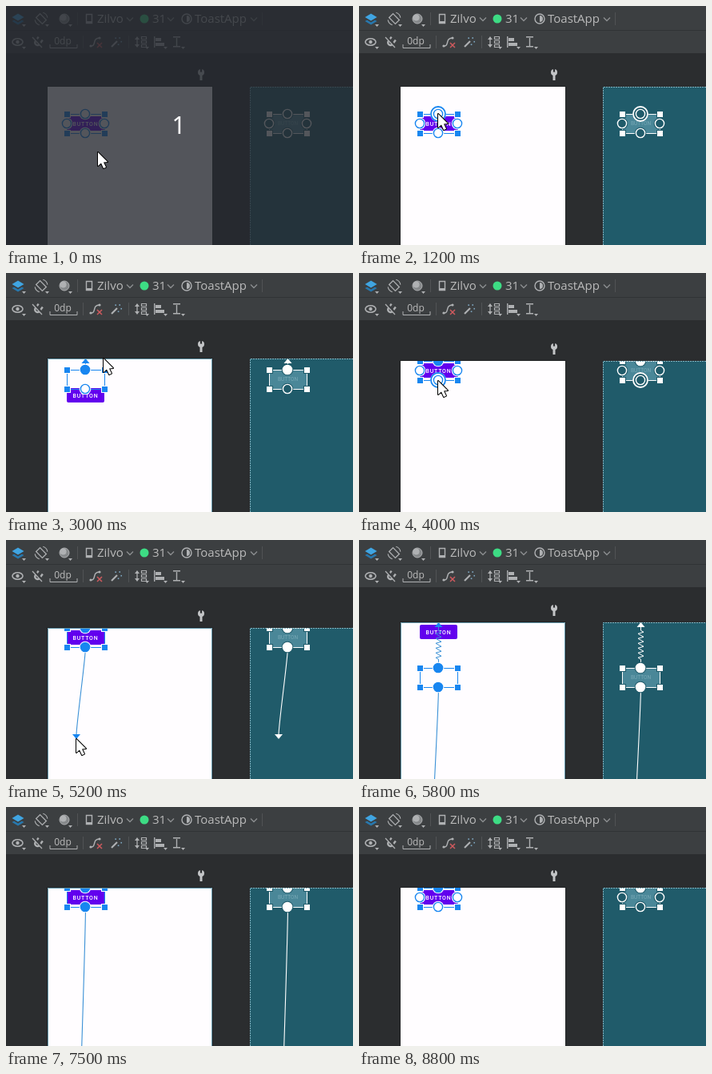
An HTML page with a canvas that plays this animation: 434 px wide and 299 px high, repeating every 9200 ms.

```html
<!DOCTYPE html>
<html lang="en">
<head>
<meta charset="utf-8">
<title>Layout editor constraints</title>
<style>
html, body { margin: 0; width: 100%; height: 100%; overflow: hidden; background: #2b2d2f; }
canvas { display: block; width: 434px; height: 299px; }
</style>
</head>
<body>
<canvas id="stage" width="434" height="299"></canvas>
<script>
const ctx = document.getElementById('stage').getContext('2d');
const W = 434, H = 299, LOOP = 9200, STEP = 100;
const GREY = '#afb1b3', BAR = '#3c3f41', SURFACE = '#2b2d2f', BLUE = '#1886f0', TEAL = '#205b6a';
const PAGE_Y = 101, LEFT = 76, RIGHT = 123, MID = 99, BUTTON_H = 24;
const START_GAP = 34, PREVIEW_GAP = 171, SCROLL = 9, BLUEPRINT_DX = 253;

// Motion
const ramp = (t, from, to) => Math.min(1, Math.max(0, (t - from) / (to - from)));
const smooth = k => k * k * (3 - 2 * k);
const mix = (a, b, k) => a.map((v, i) => v + (b[i] - v) * k);

function cursorAt(t) {
  const rest = [115, 183], handleSpot = [MID, 135], pageEdge = [122, 107];
  if (t < 1700) return mix(rest, handleSpot, smooth(ramp(t, 400, 1100)));
  if (t < 3300) return mix(handleSpot, pageEdge, ramp(t, 1700, 2700));
  if (t < 4300) return mix(pageEdge, handleSpot, smooth(ramp(t, 3300, 4000)));
  if (t < 7800) {
    const fall = (Math.min(t, 6000) - 4300) / 900;
    const sweep = Math.sin(Math.PI * ramp(t, 6600, 7500));
    return [MID - 11 * Math.min(1, fall) + 187 * sweep, 135 + 114 * fall * fall];
  }
  return mix([120, 330], [152, -22], ramp(t, 8100, 8800));
}

function sceneAt(t) {
  const shift = SCROLL * (smooth(ramp(t, 2700, 3200)) - smooth(ramp(t, 5300, 6000)));
  const preview = ramp(t, 5700, 6000) - ramp(t, 6600, 6900);
  const gap = START_GAP * (1 - ramp(t, 2700, 3200)) + PREVIEW_GAP * preview;
  const top = PAGE_Y + Math.round(shift);
  const drag = t >= 1800 && t < 2800 ? 'top' : t >= 4400 && t < 7800 ? 'bottom' : '';
  return {
    top, drag,
    cursor: cursorAt(t),
    frameY: top + Math.round(gap),
    buttonY: top + (t < 3200 ? START_GAP : 0),
    connected: t >= 2800,
    idle: !drag && !(t >= 2800 && t < 3200),
    hover: t >= 1000 && t < 1800 ? 'top' : t >= 4000 && t < 4400 ? 'bottom' : ''
  };
}

// Drawing helpers
function trace(points) {
  ctx.beginPath();
  points.forEach(([x, y]) => ctx.lineTo(x, y));
}

function stroke(color, width) {
  ctx.strokeStyle = color;
  ctx.lineWidth = width;
  ctx.stroke();
}

function line(color, width, ...points) {
  trace(points);
  stroke(color, width);
}

function poly(color, ...points) {
  trace(points);
  ctx.fillStyle = color;
  ctx.fill();
}

function rect(color, x, y, w, h) {
  ctx.fillStyle = color;
  ctx.fillRect(x, y, w, h);
}

function frame(color, width, x, y, w, h) {
  ctx.beginPath();
  ctx.rect(x, y, w, h);
  stroke(color, width);
}

function arc(color, width, x, y, r, from = 0, to = Math.PI * 2) {
  ctx.beginPath();
  ctx.arc(x, y, r, from, to);
  stroke(color, width);
}

function disc(color, x, y, r, from = 0, to = Math.PI * 2) {
  ctx.beginPath();
  ctx.arc(x, y, r, from, to);
  ctx.fillStyle = color;
  ctx.fill();
}

function text(str, x, y, font, color, align = 'left', spacing = 0) {
  ctx.font = font;
  ctx.fillStyle = color;
  ctx.textAlign = align;
  ctx.letterSpacing = spacing + 'px';
  ctx.fillText(str, x, y);
}

function placed(x, y, angle, draw) {
  ctx.save();
  ctx.translate(x, y);
  ctx.rotate(angle);
  draw();
  ctx.restore();
}

// Toolbars
const chevron = x => line('#8b8d8f', 1.4, [x - 4, 14.5], [x, 18.5], [x + 4, 14.5]);
const menuMark = (x, y) => poly(GREY, [x, y], [x + 5, y], [x + 2.5, y + 3]);
const divider = (x, y) => rect('#515355', x, y, 1, 16);
const diamond = (color, y) => poly(color, [7.5, y], [15, y - 4.5], [22.5, y], [15, y + 4.5]);

function topBar() {
  diamond('#2878ae', 19);
  diamond(BAR, 16);
  diamond('#40a5e2', 14);

  placed(44, 16, -Math.PI / 4, () => {
    frame(GREY, 1.3, -3.5, -5.5, 7, 11);
    arc(GREY, 1.1, 0, 0, 8, -0.5, 0.6);
    arc(GREY, 1.1, 0, 0, 8, Math.PI - 0.5, Math.PI + 0.6);
  });

  disc('#85888a', 73, 16, 6);
  disc(GREY, 71.5, 14.5, 4);
  arc(GREY, 1, 73, 16, 6);
  [20, 49, 78].forEach(x => menuMark(x, 23));
  [89, 320].forEach(x => divider(x, 8));

  frame(GREY, 1.4, 100.5, 10.5, 7, 11);
  rect(GREY, 100, 19, 8, 2);
  disc('#3ddc84', 173, 16, 5.5);
  arc(GREY, 1.4, 226, 16, 6);
  disc(GREY, 226, 16, 4, -Math.PI / 2, Math.PI / 2);

  const font = '15px "Open Sans", sans-serif';
  text('Zilvo', 114, 21, font, '#bbbbbb');
  text('31', 183, 21, font, '#bbbbbb');
  text('ToastApp', 236, 21, font, '#bbbbbb');
  [155, 206, 310].forEach(chevron);
}

function toolRow() {
  ctx.beginPath();
  ctx.ellipse(14.5, 45, 6.5, 4.2, 0, 0, Math.PI * 2);
  stroke(GREY, 1.6);
  disc(GREY, 14.5, 45, 2.2);

  placed(40, 45, Math.PI / 5, () => {
    line(GREY, 2.4, [-3.2, -5.5], [-3.2, 1]);
    line(GREY, 2.4, [3.2, -5.5], [3.2, 1]);
    arc(GREY, 2.4, 0, 1, 3.2, 0, Math.PI);
  });
  line(BAR, 3, [34, 38], [46, 51]);
  line(GREY, 1.2, [33, 39], [45, 52]);

  text('0dp', 71, 48, '12px "Open Sans", sans-serif', '#bbbbbb', 'center');
  line(GREY, 1, [55, 48], [55, 52.5], [89, 52.5], [89, 48]);

  ctx.beginPath();
  ctx.moveTo(105, 50);
  ctx.bezierCurveTo(114, 51, 107, 40, 117, 40);
  stroke(GREY, 1.4);
  disc(GREY, 106, 50, 1.6);
  disc(GREY, 117, 40, 1.6);
  line('#d05a5e', 1.5, [114, 46], [120, 52]);
  line('#d05a5e', 1.5, [120, 46], [114, 52]);

  line(GREY, 2.2, [132, 51], [139, 44]);
  for (let a = -2.2; a < 1.6; a += 1.2) {
    rect('#7fa9c4', 139 + 4.5 * Math.cos(a), 43 + 4.5 * Math.sin(a), 1.6, 1.6);
  }

  line(GREY, 1.3, [164, 39], [164, 51]);
  poly(GREY, [161, 42], [164, 38], [167, 42]);
  poly(GREY, [161, 48], [164, 52], [167, 48]);
  for (let y = 38; y < 52; y += 5) frame(GREY, 1.2, 169.5, y + 0.5, 6, 3);

  rect(GREY, 185, 38, 1.4, 14);
  rect(GREY, 187, 40, 7, 4);
  rect(GREY, 187, 46, 11, 4);

  rect(GREY, 209, 38, 9, 1.5);
  rect(GREY, 209, 50, 9, 1.5);
  line(GREY, 1.4, [213.5, 40], [213.5, 50]);
  [20, 174, 197, 219].forEach(x => menuMark(x, 51));
  [96, 153].forEach(x => divider(x, 37));
}

function wrench(y) {
  disc('#c3c5c7', 244, y + 4, 4);
  rect(SURFACE, 242.9, y - 1, 2.2, 4.6);
  rect('#c3c5c7', 242.5, y + 6, 3, 8);
}

// Constraint widgets
function handle(x, y, look, filled, hovered) {
  disc(look.hollow, x, y, hovered ? 10 : 7.3);
  if (hovered) arc(look.main, 1.8, x, y, 9);
  disc(filled ? look.main : look.hollow, x, y, 5.6);
  arc(look.main, 1.4, x, y, 5.6);
}

function tip(x, y, dir, color) {
  poly(color, [x - 5, y - 6 * dir], [x + 5, y - 6 * dir], [x, y]);
}

function wire(x0, y0, x1, y1, look) {
  const dir = Math.sign(y1 - y0) || 1, end = y1 - 5 * dir, bend = (end - y0) * 0.12;
  ctx.beginPath();
  ctx.moveTo(x0, y0);
  ctx.bezierCurveTo(x0, y0 + bend, x1, end - bend, x1, end);
  stroke(look.wire, 1.1);
  tip(x1, y1, dir, look.main);
}

function spring(x, y0, y1, color) {
  const pitch = 6, turns = Math.max(0, Math.floor((y1 - y0) / pitch) - 1);
  let y = y0 + (y1 - y0 - turns * pitch) / 2;
  const points = [[x, y0], [x, y]];
  for (let i = 0; i < turns; i++, y += pitch) points.push([x + 3.5, y + 2], [x - 3.5, y + 4]);
  line(color, 1, ...points, [x, y], [x, y1]);
}

function selection(s, look) {
  const y = s.frameY + 0.5, bottom = y + BUTTON_H, gap = s.frameY - s.top;
  frame(look.main, 1, LEFT + 0.5, y, RIGHT - LEFT, BUTTON_H);

  if (s.connected && gap > 3) {
    tip(MID + 0.5, s.top, -1, look.main);
    if (gap > BUTTON_H) spring(MID + 0.5, s.top + 5, y - 6, look.wire);
    else line(look.main, 1, [MID + 0.5, s.top + 5], [MID + 0.5, y - 6]);
  }
  const [cx, cy] = s.cursor;
  if (s.drag) wire(MID + 0.5, s.drag === 'top' ? y : bottom, cx, cy, look);

  for (const x of [LEFT, RIGHT]) {
    for (const cornerY of [y, bottom]) {
      rect(look.hollow, x - 4, cornerY - 4.5, 9, 9);
      rect(look.main, x - 3, cornerY - 3.5, 7, 7);
    }
    if (s.idle) handle(x, y + BUTTON_H / 2 - 0.5, look);
  }
  handle(MID, y - 0.5, look, s.connected || s.drag === 'top', s.hover === 'top');
  handle(MID, bottom - 0.5, look, s.drag === 'bottom', s.hover === 'bottom');
}

function clipTo(x, y, w, draw) {
  ctx.save();
  ctx.beginPath();
  ctx.rect(x, y, w, H);
  ctx.clip();
  draw();
  ctx.restore();
}

function designPage(s) {
  frame('#222426', 2, 52, s.top, 206, H);
  rect('#fffdff', 52, s.top, 206, H);
  clipTo(52, s.top, 206, () => {
    ctx.beginPath();
    ctx.roundRect(76, s.buttonY + 3, 47, 18, 2);
    ctx.fillStyle = '#6200ee';
    ctx.fill();
    text('BUTTON', MID + 0.5, s.buttonY + 15, '500 7px Roboto, sans-serif', '#fff', 'center', 0.8);
    selection(s, { main: BLUE, wire: '#3a90d6', hollow: '#fffdff' });
  });
  if (!s.idle) frame('#6599ac', 1, 52.5, s.top + 0.5, 205, H);
}

function blueprintPage(s) {
  rect(TEAL, 305, s.top, W - 305, H);
  clipTo(305, s.top, W - 305, () => {
    ctx.translate(BLUEPRINT_DX, 0);
    rect('#4a8798', LEFT, s.frameY, RIGHT - LEFT, BUTTON_H);
    text('BUTTON', MID + 0.5, s.frameY + 14, '6.5px Roboto, sans-serif', '#78a9b6', 'center');
    selection(s, { main: '#fff', wire: '#fff', hollow: TEAL });
  });
  ctx.setLineDash([2, 1]);
  line('#82b3c0', 1, [305.5, H], [305.5, s.top + 0.5], [W, s.top + 0.5]);
  ctx.setLineDash([]);
}

function pointer(x, y) {
  placed(x, y, 0, () => {
    trace([[0, 0], [0, 17], [4, 13.5], [7, 20], [10, 18.7], [7, 12.4], [12, 12]]);
    ctx.closePath();
    ctx.lineJoin = 'round';
    stroke('#000', 2);
    ctx.fillStyle = '#fff';
    ctx.fill();
  });
}

function countdown(strength) {
  ctx.globalAlpha = strength;
  rect('rgba(38, 41, 48, 0.79)', 0, 0, W, H);
  text('1', 216, 160, '30px "Noto Sans", sans-serif', '#fff', 'center');
  ctx.globalAlpha = 1;
}

function draw(t) {
  const s = sceneAt(t);
  rect(SURFACE, 0, 0, W, H);
  rect(BAR, 0, 0, W, 59);
  rect('#313335', 0, 30, W, 1);
  topBar();
  toolRow();
  wrench(s.top - 22);
  designPage(s);
  blueprintPage(s);
  if (t < 300) countdown(t < 200 ? 1 : 0.3);
  pointer(...s.cursor);
}

function tick() {
  const t = performance.now() % LOOP;
  draw(Math.floor(t / STEP) * STEP);
  requestAnimationFrame(tick);
}
tick();
</script>
</body>
</html>
```
